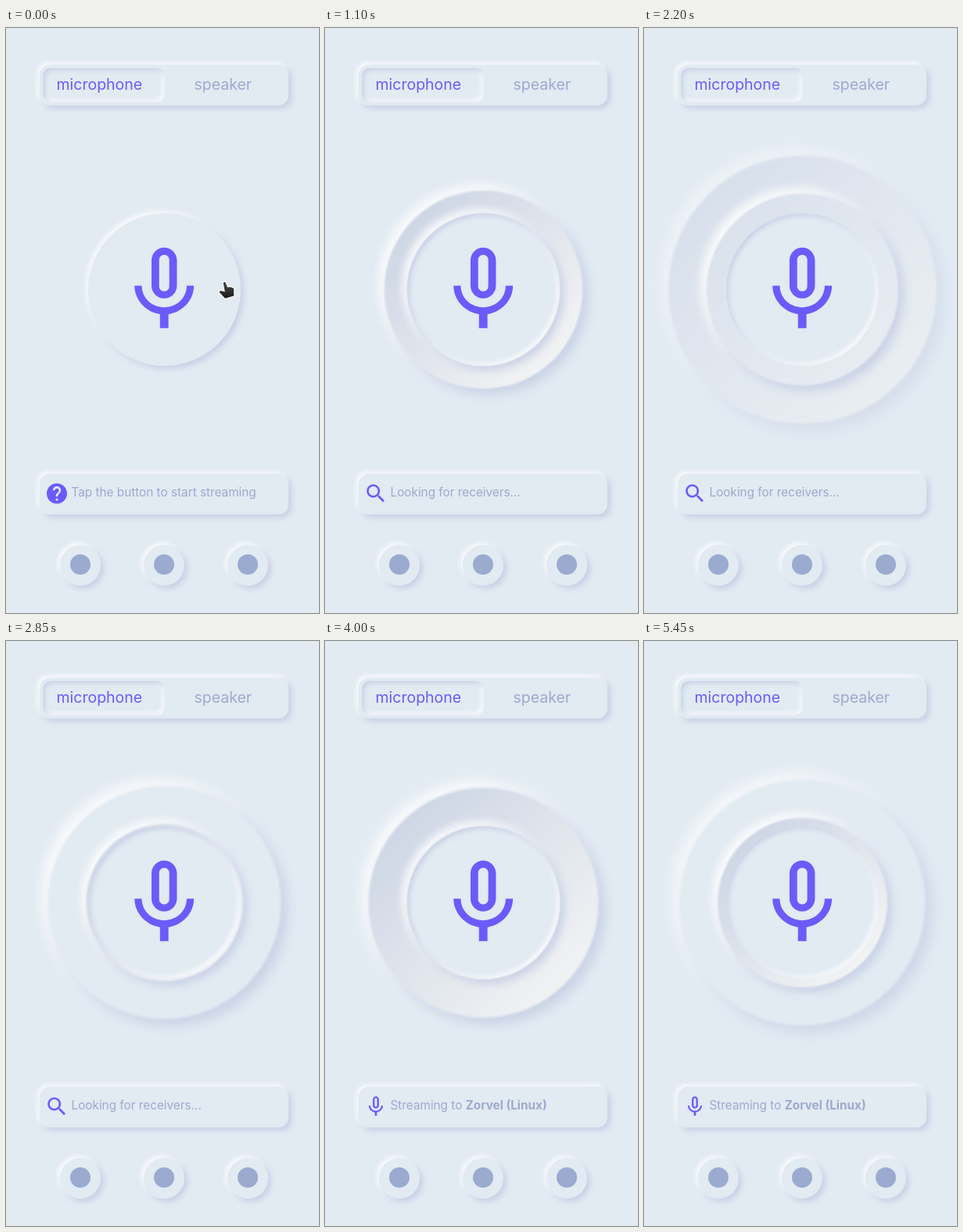
An HTML page that plays this animation: 400 by 748 pixels, repeating every 5500 ms.

```html
<!DOCTYPE html>
<html lang="en">
<head>
<meta charset="utf-8">
<title>Audio streaming</title>
<style>
  :root {
    --bg: #e2eaf2;
    --dark: #c8d0e5;
    --white: #fdfdfd;
    --muted: #9baacf;
    --primary: #6b5bfa;
    --raised: 3.9px 3.9px 7.8px var(--dark), -2.6px -2.6px 6.5px var(--white);
    --sunken: inset 2.6px 2.6px 6.5px var(--dark), inset -2.6px -2.6px 6.5px var(--white);
  }
  html, body { margin: 0; width: 100%; height: 100%; overflow: hidden; background: var(--bg); }
  #stage { position: relative; width: 400px; height: 748px; overflow: hidden; }
  #stage > * { position: absolute; }
  .panel { left: 43px; width: 318px; height: 52px; border-radius: 13px; box-shadow: var(--raised); }
  .tab { left: 47px; top: 51px; width: 156px; height: 44px; border-radius: 10.4px; box-shadow: var(--sunken); }
  .social { top: 661px; width: 52px; height: 52px; border-radius: 50%; box-shadow: var(--raised); }
  .disc { left: 105px; top: 237px; width: 195px; height: 195px; border-radius: 50%; }
  .wave { filter: blur(1px); box-shadow: 5.2px 5.2px 10.4px var(--dark), -5.2px -5.2px 10.4px var(--white); }
  #waveA { background: linear-gradient(to bottom right, #c7d0e2, #f9f9f6); }
  #button { background: var(--bg); box-shadow: var(--raised); }
  #button.pressed { box-shadow: var(--sunken); }
  svg { left: 0; top: 0; font-family: Inter, "Open Sans", sans-serif; fill: var(--muted); }
  .label { font-size: 19.5px; }
  .info { font-size: 15.3px; }
  .primary { fill: var(--primary); }
</style>
</head>
<body>
<div id="stage">
  <div class="panel" style="top:47px"></div>
  <div class="tab"></div>
  <div class="panel" style="top:570px"></div>
  <div class="social" style="left:69px"></div>
  <div class="social" style="left:176px"></div>
  <div class="social" style="left:283px"></div>
  <div class="disc wave" id="waveA"></div>
  <div class="disc wave" id="waveB"></div>
  <div class="disc" id="button"></div>

  <svg width="400" height="748" viewBox="0 0 400 748">
    <defs>
      <path id="mic" d="M12 14c1.66 0 3-1.34 3-3V5c0-1.66-1.34-3-3-3S9 3.34 9 5v6c0 1.66 1.34 3 3 3zm-1.2-9.1c0-.66.54-1.2 1.2-1.2s1.2.54 1.2 1.2l-.01 6.2c0 .66-.53 1.2-1.19 1.2s-1.2-.54-1.2-1.2V4.9zm6.5 6.1c0 3-2.54 5.1-5.3 5.1S6.7 14 6.7 11H5c0 3.41 2.72 6.23 6 6.72V21h2v-3.28c3.28-.48 6-3.3 6-6.72h-1.7z"/>
      <path id="search" d="M15.5 14h-.79l-.28-.27C15.41 12.59 16 11.11 16 9.5 16 5.91 13.09 3 9.5 3S3 5.91 3 9.5 5.91 16 9.5 16c1.61 0 3.09-.59 4.23-1.57l.27.28v.79l5 4.99L20.49 19l-4.99-5zm-6 0C7.01 14 5 11.99 5 9.5S7.01 5 9.5 5 14 7.01 14 9.5 11.99 14 9.5 14z"/>
      <path id="help" d="M12 2C6.48 2 2 6.48 2 12s4.48 10 10 10 10-4.48 10-10S17.52 2 12 2zm1 17h-2v-2h2v2zm2.07-7.75l-.9.92C13.45 12.9 13 13.5 13 15h-2v-.5c0-1.1.45-2.1 1.17-2.83l1.24-1.26c.37-.36.59-.86.59-1.41 0-1.1-.9-2-2-2s-2 .9-2 2H8c0-2.21 1.79-4 4-4s4 1.79 4 4c0 .88-.36 1.68-.93 2.25z"/>
      <linearGradient id="ink" x1="0" y1="0" x2="0" y2="1">
        <stop stop-color="#4a4a4a"/>
        <stop offset="1" stop-color="#1c1c1c"/>
      </linearGradient>
    </defs>

    <text class="label primary" x="64.5" y="79">microphone</text>
    <text class="label" x="240.5" y="79">speaker</text>
    <use class="primary" href="#mic" transform="translate(137.2 270) scale(5.417)"/>

    <g class="info">
      <g class="state">
        <use class="primary" href="#help" transform="translate(49.4 579.6) scale(1.3)"/>
        <text x="83.5" y="599">Tap the button to start streaming</text>
      </g>
      <g class="state">
        <use class="primary" href="#search" transform="translate(49.4 579.6) scale(1.3)"/>
        <text x="83.5" y="599">Looking for receivers...</text>
      </g>
      <g class="state">
        <use class="primary" href="#mic" transform="translate(49.4 579.6) scale(1.3)"/>
        <text x="83.5" y="599">Streaming to <tspan font-weight="700">Zorvel (Linux)</tspan></text>
      </g>
    </g>

    <circle cx="95" cy="686" r="13"/>
    <circle cx="202" cy="686" r="13"/>
    <circle cx="309" cy="686" r="13"/>

    <path id="cursor" fill="url(#ink)" stroke="#fff" stroke-width="2.6" stroke-linejoin="round" paint-order="stroke"
      d="M277.6 326q1-2.4 3-.6l2.4 6.2q5.6-1.2 8.2 1.6v9.4l-11.2 3.2-6.6-7q-1.6-2.6 .8-2.8l5.6 1.2z"/>
  </svg>
</div>

<script>
  const LOOP = 5500, PRESS = 386, CONNECT = 2925, WAVE = 2400;
  const $ = id => document.getElementById(id);
  const states = document.querySelectorAll('.state');
  const show = (el, on) => { el.style.visibility = on ? 'visible' : 'hidden'; };

  // Grows to double size; fades during the second half
  function wave(el, t) {
    const p = t < 0 ? 0 : t % WAVE / WAVE;
    el.style.transform = `scale(${1 + p})`;
    el.style.opacity = Math.min(1, 2 - 2 * p);
  }

  function draw(t) {
    const pressed = t >= PRESS;
    const state = !pressed ? 0 : t < CONNECT ? 1 : 2;
    states.forEach((el, i) => show(el, i === state));
    show($('cursor'), !pressed);
    show($('waveA'), pressed);
    show($('waveB'), pressed);
    $('button').classList.toggle('pressed', pressed);
    wave($('waveA'), t - PRESS);
    wave($('waveB'), t - PRESS - WAVE / 2);
  }

  const start = performance.now();
  function tick() {
    draw((performance.now() - start) % LOOP);
    requestAnimationFrame(tick);
  }
  tick();
</script>
</body>
</html>
```
